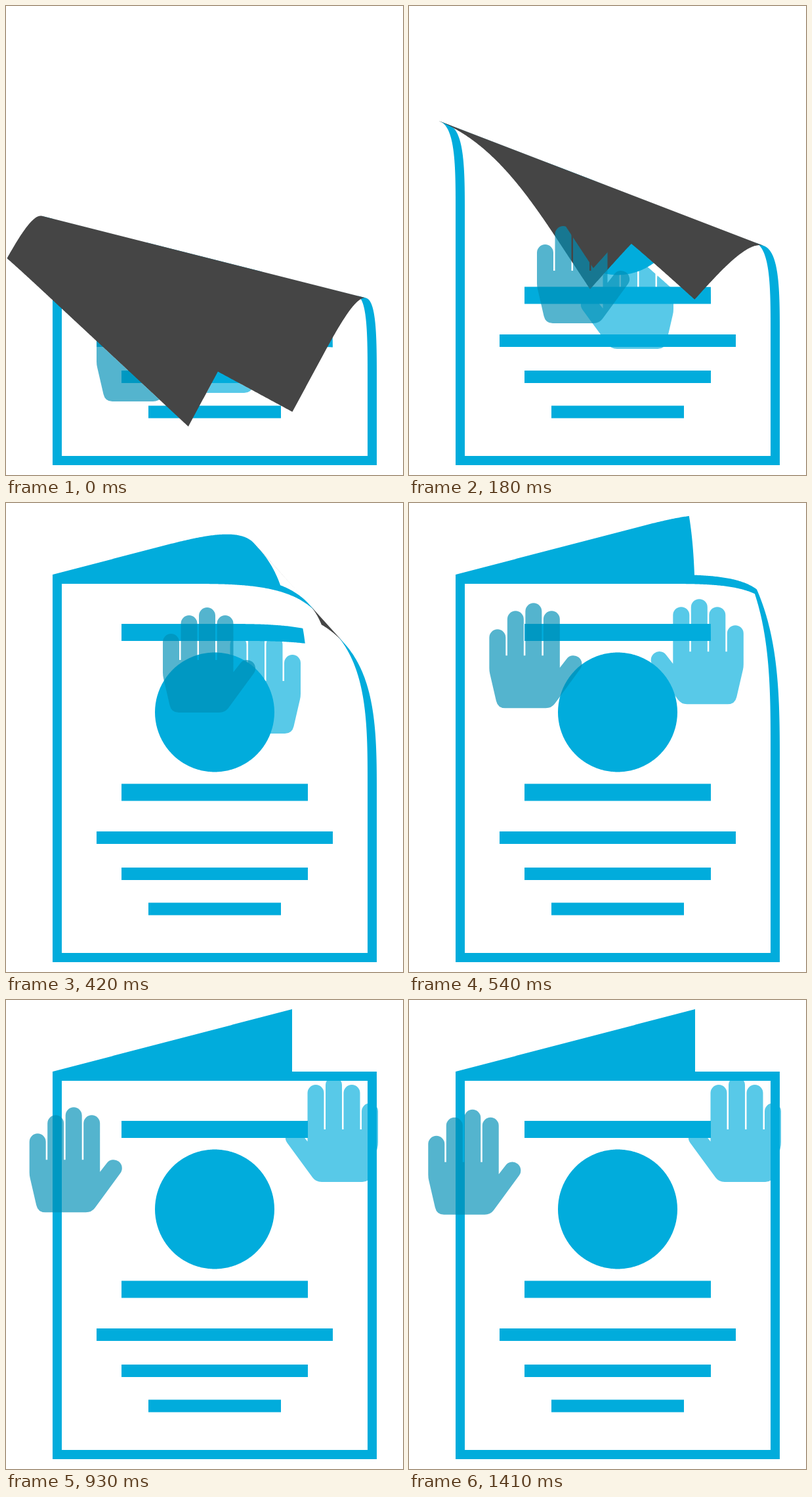
Recreate the animation shown at these times as an HTML page with a canvas. Size 605 px wide and 714 px high, loop 3.63 s.

```html
<!DOCTYPE html>
<html lang="en">
<head>
<meta charset="utf-8">
<title>Page unrolled by two hands</title>
<style>
html, body { margin: 0; width: 100%; height: 100%; overflow: hidden; background: #fff; }
canvas { display: block; }
</style>
</head>
<body>
<canvas id="stage" width="605" height="714"></canvas>
<script>
const ctx = document.getElementById('stage').getContext('2d');
const LOOP = 3630, STEP = 30, END = 1410, LETGO = 420;
const BLUE = '#01acdc', BACK = '#454545';
const R = 117.2, QUARTER = Math.PI * R / 2, HALF = Math.PI * R;

// Key poses; hands are measured from where they come to rest
const TIMES = [0, 180, 300, LETGO, 690, 870];
const crest = ease(-296.6, -147.1, 64.1, 239.3, 505, 580);
const rightX = ease(-180, -164, -149, -118, 0, 0);
const rightY = ease(312, 245, 158, 74, 7.5, 0);
const leftX = ease(109, 166, 212, 210);
const leftY = ease(275, 156, 40, -8);

// Four rounded fingers, a palm and a thumb
const finger = (x, top) => `M${x} 250 V${top + 12.5} a12.5 12.5 0 0 1 25 0 V250 Z`;
const HAND = new Path2D(
  [207, 179, 167, 179].map((top, i) => finger(29 + 27.5 * i, top)).join(' ') +
  `M29 247 H136.5 V265.5 L147 252 A12.8 12.8 0 0 1 167.5 267.5 L129 320
   Q124 327 115 327 H53 Q42 327 39.5 316 L30 275 Q29 271 29 266 Z`);

const rect = (x, y, x2, y2) => [[x, y], [x2, y], [x2, y2], [x, y2]];
const bar = (width, y, height) => [rect(318 - width / 2, y, 318 + width / 2, y + height)];
const disc = Array.from({ length: 90 }, (_, i) => {
  const a = i * Math.PI / 45;
  return [318 + 91 * Math.cos(a), 318.5 + 91 * Math.sin(a)];
});
const PAGE = [[71, 109], [436, 14], [436, 109], [565, 109], [565, 699], [71, 699]];
const ART = [
  [PAGE, rect(85, 123, 551, 685)],
  [disc],
  bar(284, 184, 26), bar(284, 427.5, 26),
  bar(360, 500, 19), bar(284, 555, 19), bar(202, 608.5, 19)
];

// Smooth curve through the values at TIMES, without overshoot
function ease(...vals) {
  const last = vals.length - 1;
  const gap = i => TIMES[i + 1] - TIMES[i];
  const rate = i => (vals[i + 1] - vals[i]) / gap(i);
  const slope = i => {
    if (i === 0) return 1.5 * rate(0) - .5 * slope(1);
    if (i === last || rate(i - 1) * rate(i) <= 0) return 0;
    return (rate(i - 1) * gap(i) + rate(i) * gap(i - 1)) / (gap(i - 1) + gap(i));
  };
  return t => {
    if (t >= TIMES[last]) return vals[last];
    let i = 0;
    while (t >= TIMES[i + 1]) i++;
    const h = gap(i), u = (t - TIMES[i]) / h, d = vals[i + 1] - vals[i];
    const a = slope(i) * h, b = slope(i + 1) * h;
    return vals[i] + u * (a + u * (3 * d - 2 * a - b + u * (a + b - 2 * d)));
  };
}

// The left hand rises with the page, then glides away and slows down
function leftHand(t) {
  const free = Math.max(0, t - LETGO), fade = Math.exp(-free / 148);
  return [leftX(t) * fade, (leftY(t) - .21 * free) * fade];
}

// Page wrapped round a cylinder that turns as its crest advances;
// points of the side facing away give null
function curl(top) {
  const a = (41.2 + 37.9 * Math.tanh((top - 150) / 500)) * Math.PI / 180;
  const nx = Math.sin(a), ny = -Math.cos(a);
  return (x, y, back) => {
    const s = x * nx + y * ny - top + R;
    if (s > QUARTER !== back) return null;
    const d = (s < 0 ? s : s < HALF ? R * Math.sin(s / R) : HALF - s) - s;
    return [x + nx * d, y + ny * d];
  };
}

function trace(path, points, map, back, dx = 0, dy = 0) {
  const seen = [];
  points.forEach(([x, y], i) => {
    const [x2, y2] = points[(i + 1) % points.length];
    const n = Math.ceil(Math.hypot(x2 - x, y2 - y) / 2);
    for (let k = 0; k < n; k++) {
      const p = map(x + (x2 - x) * k / n, y + (y2 - y) * k / n, back);
      if (p) seen.push(p);
    }
  });
  seen.forEach(([x, y], i) => path[i ? 'lineTo' : 'moveTo'](x + dx, y + dy));
  if (seen.length) path.closePath();
}

// The flap, moved by (hideX, hideY), masks the hand
function drawHand(color, map, hideX, hideY, flip, x, y) {
  ctx.save();
  const clip = new Path2D();
  clip.rect(0, 0, 605, 714);
  trace(clip, PAGE, map, true, hideX, hideY);
  ctx.clip(clip, 'evenodd');
  ctx.transform(flip, 0, 0, 1, x, y);
  ctx.fillStyle = color;
  ctx.fill(HAND);
  ctx.restore();
}

function draw(t) {
  const map = curl(crest(t)), k = Math.min(t / 180, 1);
  ctx.fillStyle = '#fff';
  ctx.fillRect(0, 0, 605, 714);

  drawHand('rgba(2,174,221,.66)', map, -7 * k, 8 * k, -1, 596 + rightX(t), rightY(t) - 50);

  ctx.fillStyle = BLUE;
  for (const loops of ART) {
    const path = new Path2D();
    for (const loop of loops) trace(path, loop, map, false);
    ctx.fill(path, 'evenodd');
  }

  const flap = new Path2D();
  trace(flap, PAGE, map, true);
  ctx.fillStyle = BACK;
  ctx.fill(flap);

  drawHand('rgba(0,143,183,.67)', map, 5 * k, -32 * k, 1, ...leftHand(t));
}

function tick() {
  const t = performance.now() % LOOP;
  draw(Math.min(Math.floor(t / STEP) * STEP, END));
  requestAnimationFrame(tick);
}
tick();
</script>
</body>
</html>
```
